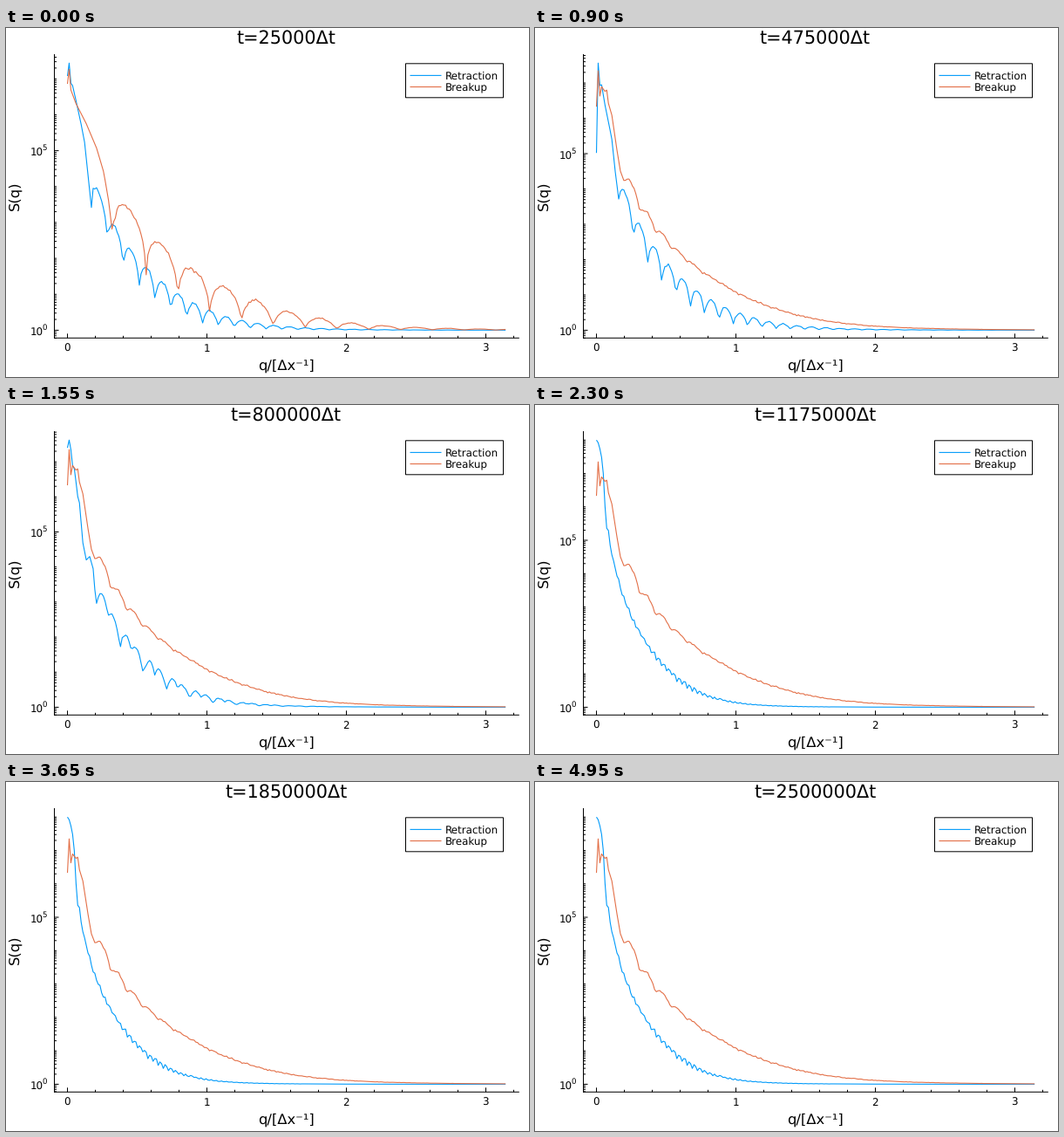
Write a matplotlib script that moves like this. It is 600 px wide and 400 px high and loops after 5 s.

```python
import numpy as np
import matplotlib
import matplotlib.pyplot as plt
from matplotlib.animation import FuncAnimation
from matplotlib.collections import LineCollection
from matplotlib.patches import Rectangle

matplotlib.rcParams["font.family"] = "DejaVu Sans"
matplotlib.rcParams["text.hinting"] = "none"
matplotlib.rcParams["path.snap"] = False

W, H, DPI = 600, 400, 100
FRAMES, STEP_MS = 100, 50
LEFT, RIGHT, TOP, BOTTOM = 55.5, 588.3, 30.5, 355.3
X0, UNIT = 70.5, 160          # pixel of q = 0 and pixels per unit of q
FLOOR, SPAN = 346.4, 306.2    # pixel of S = 1 and height of the data range
BLUE, ORANGE = "#009afa", "#e36f47"

Q = np.linspace(0, np.pi, 257)
rng = np.random.default_rng(4)


def fringe(dip, period, low, grow):
    """Interference dips that fade out towards large q."""
    floor = np.minimum(low + grow * Q, 1)
    return floor + (1 - floor) * np.abs(np.sin(np.pi * (Q - dip) / period))


def spectrum(head, level, slope, pattern):
    """log10 S: key points (q, log S) first, then a power law above S = 1."""
    hq, hs = zip(*head)
    q = np.maximum(Q, hq[-1])
    noise = rng.normal(0, 0.02, Q.size)
    tail = np.log10(1 + 10 ** (level - slope * np.log10(q) + noise) * pattern)
    return np.where(Q < hq[-1], np.interp(Q, hq, hs), tail)


RETRACTION = ([0, 900, 1550, 2250], [
    spectrum([(0, 7.08), (.0123, 7.44), (.0245, 6.88), (.037, 6.81),
              (.061, 6.4), (.1, 5.7), (.123, 5.23), (.147, 4.33),
              (.172, 3.41)],
             0.44, 5.25, fringe(.173, .1137, .14, .05)),
    spectrum([(0, 5.02), (.0123, 7.57), (.0245, 6.93), (.037, 6.95),
              (.06, 6.4), (.086, 5.9), (.11, 5.42), (.135, 4.48),
              (.16, 3.7)],
             0.36, 5.15, fringe(.161, .1025, .14, .05)),
    spectrum([(0, 7.4), (.0123, 7.62), (.0245, 7.35), (.037, 6.88),
              (.05, 6.8), (.074, 6.0), (.086, 5.83), (.11, 4.7),
              (.135, 4.2), (.16, 4.3), (.185, 3.94), (.208, 2.75)],
             0.13, 5.25,
             fringe(.209, .0834, .4, .15) * fringe(.209, .1668, .4, .15)),
    spectrum([(0, 8), (.0123, 7.92), (.0245, 7.74), (.037, 7.48),
              (.049, 7.0), (.061, 6.04), (.074, 5.34), (.086, 5.29),
              (.11, 4.43)],
             -0.37, 5.25, fringe(.1425, .0363, .65, 0)),
])

BREAKUP = ([0, 700], [
    spectrum([(0, 6.86), (.0123, 7.27), (.0245, 6.69), (.06, 6.32),
              (.134, 5.76), (.21, 5.06), (.26, 4.4), (.297, 3.56),
              (.33, 2.45)],
             1.45, 5.4, fringe(.336, .228, .02, .06)),
    spectrum([(0, 6.33), (.0123, 7.35), (.0245, 6.63), (.037, 6.9),
              (.06, 6.76), (.074, 6.8), (.086, 6.42), (.11, 6.1),
              (.147, 5.1), (.172, 4.5), (.2, 4.2)],
             1.05, 5.2, fringe(.203, .11, .15, 1)),
])


def blend(times, keys, ms):
    """Linear mix of the key curves around the given time."""
    pos = np.interp(ms, times, range(len(keys)))
    k = min(int(pos), len(keys) - 2)
    return keys[k] + (pos - k) * (keys[k + 1] - keys[k])


fig = plt.figure(figsize=(W / DPI, H / DPI), dpi=DPI, facecolor="white")
ax = fig.add_axes([0, 0, 1, 1])
ax.set_xlim(0, W)
ax.set_ylim(H, 0)
ax.axis("off")


def px(size):
    return size * 72 / DPI


def label(x, y, text, size=11.9, ha="center", **kw):
    return ax.text(x, y, text, fontsize=px(size), ha=ha, va="baseline",
                   color="black", **kw)


def line(xs, ys, color="black", width=1.0, cap="butt", **kw):
    return ax.plot(xs, ys, color=color, lw=px(width),
                   solid_capstyle=cap, **kw)[0]


# Axes and fixed labels
line([LEFT, RIGHT], [BOTTOM, BOTTOM], cap="projecting")
line([LEFT, LEFT], [TOP, BOTTOM], cap="projecting")
for n in range(17):
    tick_x = X0 + n * UNIT / 5
    major = n % 5 == 0
    line([tick_x, tick_x], [BOTTOM, BOTTOM - (5 if major else 2.5)])
    if major:
        label(tick_x - 0.5, 371.3, str(n // 5))
label(321.9, 392, "q/[Δx⁻¹]", 16.35)
label(15, 192.3, "S(q)", 16.35, rotation=90, rotation_mode="anchor")

title = label(321.4, 18.2, "", 20.8)
ticks = LineCollection([], colors="black", linewidths=px(1))
ax.add_collection(ticks, autolim=False)
power_labels = [(p, label(27.2, 0, "10", ha="left"),
                 label(41.6, 0, str(p), 8.6, ha="left")) for p in (0, 5)]

X = X0 + UNIT * Q
blue = line(X, X, BLUE, 1.1, solid_joinstyle="round")
orange = line(X, X, ORANGE, 1.1, solid_joinstyle="round")

# Legend
ax.add_patch(Rectangle((458.5, 40.8), 112, 39, fc="white", ec="black",
                       lw=px(1), zorder=3))
for y, color, name in ((54.4, BLUE, "Retraction"), (67.5, ORANGE, "Breakup")):
    line([463.5, 499.5], [y, y], color, 1.1, zorder=4)
    label(503.6, y + 4.2, name, ha="left", zorder=4)


def draw(i):
    ms = i * STEP_MS
    s_blue = blend(*RETRACTION, ms)
    s_orange = blend(*BREAKUP, ms)
    peak = max(s_blue.max(), s_orange.max())

    def to_y(v):
        return FLOOR - SPAN * v / peak

    blue.set_ydata(to_y(s_blue))
    orange.set_ydata(to_y(s_orange))
    title.set_text(f"t={25000 * (i + 1)}Δt")

    segments = []
    for e in range(-1, 9):
        for m in range(1, 10):
            v = e + np.log10(m)
            if -0.03 * peak <= v <= 1.03 * peak:
                size = 5 if m == 1 and e in (0, 5) else 2.5
                segments.append([(LEFT, to_y(v)), (LEFT + size, to_y(v))])
    ticks.set_segments(segments)
    for p, base, exponent in power_labels:
        base.set_y(to_y(p) + 6.5)
        exponent.set_y(to_y(p) - 0.3)
    return blue, orange, title, ticks


anim = FuncAnimation(fig, draw, frames=FRAMES, interval=STEP_MS,
                     repeat=True, repeat_delay=0, blit=False)
plt.show()
```
